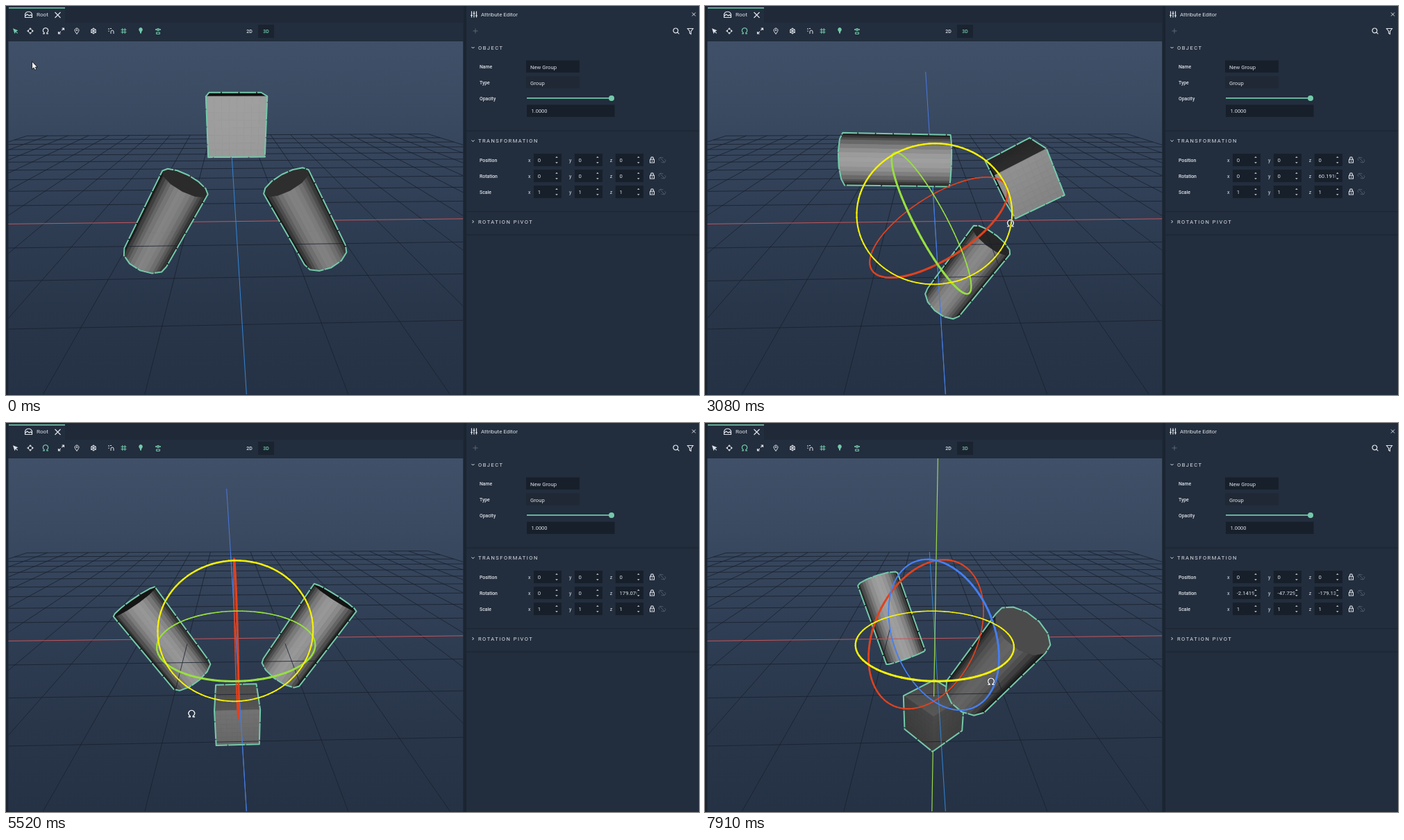
Write an HTML page with a canvas that moves like this. It is 998 px wide and 561 px high and loops after 8 s.

```html
<!DOCTYPE html>
<html lang="en">
<head>
<meta charset="utf-8">
<title>Group rotation</title>
<style>
html, body { margin: 0; width: 100%; height: 100%; overflow: hidden; background: #222d3d; }
canvas { display: block; width: 998px; height: 561px; }
</style>
</head>
<body>
<canvas id="stage" width="998" height="561"></canvas>
<script>
const ctx = document.getElementById('stage').getContext('2d');
const { sin, cos, PI, hypot, max, min, floor } = Math;
const RAD = PI / 180, LOOP = 8000;
const MINT = '#74c9aa', WHITE = '#dfe4ea', DIM = '#4d5a6b';

// ---------- timing ----------
// Bursts of evenly spaced picture updates: [start, end, steps]
const BURSTS = [[120, 550, 4], [940, 1910, 8], [2040, 3080, 9], [3230, 4190, 8],
  [4310, 4970, 6], [5520, 6480, 7], [6620, 7130, 5], [7280, 7550, 3], [7670, 7910, 3]];

function snap(t) {
  let at = 0;
  for (const [a, b, n] of BURSTS) {
    if (t < a) break;
    const step = (b - a) / (n - 1);
    at = min(b, a + floor((t - a) / step + 1e-6) * step);
  }
  return at;
}

const mix = (a, b, k) => a + (b - a) * k;

function track(keys, t) {
  if (t <= keys[0][0]) return keys[0][1];
  for (let i = 1; i < keys.length; i++) {
    const [t0, v0] = keys[i - 1], [t1, v1] = keys[i];
    if (t <= t1) return mix(v0, v1, (t - t0) / (t1 - t0));
  }
  return keys[keys.length - 1][1];
}

// The solids run slightly ahead of the rings and the number fields
const LEAD = 18;
const SPIN = [[1780, 0], [1910, 1.2508], [2300, 17], [3080, 60.191], [4310, 141.62],
  [4970, 177.6], [5520, 179.07], [5680, 180.87]];
const TURN = [[6600, 0], [7130, 16.298], [7910, 47.729]];
const PITCH = [[6600, 0], [6760, 0.95], [7130, 1.3896], [7910, 2.1419]];
const REACH = [[1910, 114], [3080, 109], [4310, 105], [5520, 126]];
const MOVE_X = [[0, 38], [550, 60], [940, 60], [1640, 388], [1780, 391]];
const MOVE_Y = [[0, 81], [550, 34], [940, 34], [1640, 210], [1780, 213]];
const LEAVE_X = [[5680, 266], [6400, 273], [6620, 275], [7130, 319], [7910, 412]];
const LEAVE_Y = [[5680, 418], [6400, 366], [6620, 366], [7130, 372], [7910, 373]];

function pointer(t, spin) {
  if (t < 1800) return [track(MOVE_X, t), track(MOVE_Y, t)];
  if (t > 5680) return [track(LEAVE_X, t), track(LEAVE_Y, t)];
  const a = (spin + 31.3) * RAD, r = track(REACH, t);
  return [CX + r * sin(a), CY - r * cos(a)];
}

// ---------- camera ----------
const CX = 331, CY = 310.6, F = 452, D = 6.64, R = 1.635;
const TS = sin(25.6 * RAD), TC = cos(25.6 * RAD), YS = sin(0.0266), YC = cos(0.0266);
const EYE = [-D * TC * YS, D * TS, D * TC * YC];

function project([x, y, z]) {
  const a = x * YC + z * YS, b = z * YC - x * YS, d = D - y * TS - b * TC;
  return [CX + F * a / d, CY - F * (y * TC - b * TS) / d, d];
}

const lerp3 = (a, b, k) => a.map((v, i) => mix(v, b[i], k));

function line3(a, b, color, width = 1) {
  const near = 0.3, da = project(a)[2], db = project(b)[2];
  if (da < near && db < near) return;
  if (da < near) a = lerp3(a, b, (near - da) / (db - da));
  if (db < near) b = lerp3(a, b, (near - project(a)[2]) / (db - project(a)[2]));
  const p = project(a), q = project(b);
  ctx.strokeStyle = color;
  ctx.lineWidth = width;
  ctx.beginPath();
  ctx.moveTo(p[0], p[1]);
  ctx.lineTo(q[0], q[1]);
  ctx.stroke();
}

// clockwise about z
const roll = ([x, y, z], a) => [x * cos(a) + y * sin(a), y * cos(a) - x * sin(a), z];
const swing = ([x, y, z], a) => [x * cos(a) + z * sin(a), y, z * cos(a) - x * sin(a)];

function poseAt(t) {
  const spin = track(SPIN, t) * RAD, turn = track(TURN, t) * RAD;
  return p => roll(swing(p, turn), spin);
}

// ---------- models ----------
function makeCube() {
  const faces = [], n = 8;
  for (let axis = 0; axis < 3; axis++) for (const side of [-1, 1]) {
    const at = (u, v) => {
      const p = [];
      p[axis] = side / 2;
      p[(axis + 1) % 3] = u / n - 0.5;
      p[(axis + 2) % 3] = v / n - 0.5;
      p[1] += 2;
      return p;
    };
    const normal = [0, 0, 0];
    normal[axis] = side;
    for (let u = 0; u < n; u++) for (let v = 0; v < n; v++)
      faces.push({ pts: [at(u, v), at(u + 1, v), at(u + 1, v + 1), at(u, v + 1)], normal, flat: normal });
  }
  return { faces, center: [0, 2, 0] };
}

function makeCylinder(x, tilt) {
  const n = 12, strips = 3, faces = [], center = [x, 0, 0];
  const place = p => { const q = roll(p, tilt); return [q[0] + x, q[1], q[2]]; };
  const rim = (i, h) => [0.5 * cos(i * 2 * PI / n), h, 0.5 * sin(i * 2 * PI / n)];
  const dir = i => roll([cos(i * 2 * PI / n), 0, sin(i * 2 * PI / n)], tilt);
  for (let i = 0; i < n; i++) for (let j = 0; j < strips; j++) {
    const at = (k, h) => place(lerp3(rim(i, h), rim(i + 1, h), k / strips));
    faces.push({
      pts: [at(j, -1), at(j + 1, -1), at(j + 1, 1), at(j, 1)],
      normal: dir(i + (j + 0.5) / strips), flat: dir(i + 0.5)
    });
  }
  for (const h of [-1, 1]) {
    const normal = roll([0, h, 0], tilt);
    faces.push({ pts: Array.from({ length: n }, (_, i) => place(rim(i, h))), normal, flat: normal });
  }
  return { faces, center };
}

const MODELS = [makeCube(), makeCylinder(-1.5, PI / 6), makeCylinder(1.5, -PI / 6)];

const dot = (a, b) => a[0] * b[0] + a[1] * b[1] + a[2] * b[2];

// Lit from the eye, so faces turned away are dropped
function shadeFaces(model, pose) {
  const out = [];
  for (const f of model.faces) {
    const pts = f.pts.map(pose);
    const mid = [0, 1, 2].map(i => pts.reduce((s, p) => s + p[i], 0) / pts.length);
    const ray = EYE.map((v, i) => v - mid[i]);
    if (dot(pose(f.flat), ray) <= 0) continue;
    const lit = max(0, dot(pose(f.normal), ray) / hypot(...ray));
    const g = Math.round(14 + 146 * lit ** 1.5);
    out.push({ pts, color: `rgb(${g},${g},${g})` });
  }
  return out;
}

function cutByGround(pts, side) {
  const out = [];
  pts.forEach((p, i) => {
    const q = pts[(i + 1) % pts.length];
    if (p[1] * side >= 0) out.push(p);
    if (p[1] * q[1] < 0) out.push(lerp3(p, q, p[1] / (p[1] - q[1])));
  });
  return out;
}

function paint(faces, side) {
  ctx.lineWidth = 0.7;
  for (const f of faces) {
    const pts = cutByGround(f.pts, side);
    if (pts.length < 3) continue;
    ctx.fillStyle = ctx.strokeStyle = f.color;
    ctx.beginPath();
    pts.map(project).forEach(p => ctx.lineTo(p[0], p[1]));
    ctx.closePath();
    ctx.fill();
    ctx.stroke();
  }
}

function hullPath(faces) {
  const pts = faces.flatMap(f => f.pts.map(project)).sort((a, b) => a[0] - b[0] || a[1] - b[1]);
  const half = list => {
    const h = [];
    for (const p of list) {
      while (h.length > 1) {
        const [a, b] = h.slice(-2);
        if ((b[0] - a[0]) * (p[1] - a[1]) - (b[1] - a[1]) * (p[0] - a[0]) > 0.01) break;
        h.pop();
      }
      h.push(p);
    }
    return h.slice(0, -1);
  };
  const path = new Path2D();
  [...half(pts), ...half(pts.reverse())].forEach(p => path.lineTo(p[0], p[1]));
  path.closePath();
  return path;
}

function outline(hulls) {
  hulls.forEach((hull, i) => {
    ctx.save();
    for (const nearer of hulls.slice(i + 1)) {
      const hole = new Path2D();
      hole.rect(0, 0, 998, 561);
      hole.addPath(nearer);
      ctx.clip(hole, 'evenodd');
    }
    ctx.strokeStyle = MINT;
    ctx.lineWidth = 2;
    ctx.lineJoin = 'round';
    ctx.setLineDash([24, 1.5]);
    ctx.stroke(hull);
    ctx.restore();
  });
}

function ring(axis, color, pose) {
  const n = 96;
  const at = i => {
    const a = i * 2 * PI / n, p = [0, 0, 0];
    p[(axis + 1) % 3] = R * cos(a);
    p[(axis + 2) % 3] = R * sin(a);
    return pose(p);
  };
  ctx.lineCap = 'round';
  for (let i = 0; i < n; i++) {
    const a = at(i);
    line3(a, at(i + 1), color, 2.1 * (D / project(a)[2]) ** 1.5);
  }
  ctx.lineCap = 'butt';
}

function grid(guide) {
  const dark = 'rgba(24,32,46,.8)';
  for (let i = -10; i <= 10; i++) if (i) {
    line3([i, 0, -10], [i, 0, 10], dark);
    line3([-10, 0, i], [10, 0, i], dark);
  }
  line3([-10, 0, 0], [10, 0, 0], '#c4555a');
  line3([0, 0, -10], [0, 0, 10], '#3485d4');
  if (guide) line3([0, 0, -2000], [0, 0, 10], '#4a78e0');
}

function viewport(t) {
  ctx.save();
  ctx.beginPath();
  ctx.rect(3.5, 51, 655, 509);
  ctx.clip();
  const sky = ctx.createLinearGradient(0, 51, 0, 560);
  [[0, '#405068'], [0.2, '#3a4a61'], [0.48, '#2f3e54'], [0.75, '#29364a'], [1, '#253245']]
    .forEach(s => sky.addColorStop(...s));
  ctx.fillStyle = sky;
  ctx.fillRect(3, 51, 656, 510);

  const pose = poseAt(t + LEAD), gizmo = poseAt(t);
  const items = MODELS.map(m => ({ faces: shadeFaces(m, pose), depth: project(pose(m.center))[2] }))
    .sort((a, b) => b.depth - a.depth);
  const guideZ = t >= 1760 && t < 5800, guideY = t >= 6600;
  const stem = (a, b) => guideY && line3(gizmo([0, a, 0]), gizmo([0, b, 0]), '#9bd84c', 1.2);

  stem(1.5, 40);
  items.forEach(o => paint(o.faces, -1));
  grid(guideZ);
  items.forEach(o => paint(o.faces, 1));
  stem(1.5, -40);
  outline(items.map(o => hullPath(o.faces)));

  if (t >= 940) {
    const hot = t >= 6300 ? 1 : t >= 1600 && t < 5900 ? 2 : -1;
    ['#df421f', '#97e03f', '#447ff5'].forEach((c, axis) => axis !== hot && ring(axis, c, gizmo));
    if (hot >= 0) ring(hot, '#f6f205', gizmo);
  }
  ctx.restore();
}

// ---------- interface ----------
function box(x, y, w, h, color) {
  ctx.fillStyle = color;
  ctx.fillRect(x, y, w, h);
}

function text(s, x, y, size, color = WHITE, { gap = 0, weight = 400, align = 'left' } = {}) {
  ctx.font = `${weight} ${size}px Roboto, sans-serif`;
  ctx.letterSpacing = gap + 'px';
  ctx.textAlign = align;
  ctx.textBaseline = 'alphabetic';
  ctx.fillStyle = color;
  ctx.fillText(s, x, y + size * 0.355);
}

function icon(x, y, d, color = WHITE, fill = false, width = 1) {
  ctx.save();
  ctx.translate(x, y);
  const p = new Path2D(d);
  ctx.lineWidth = width;
  ctx.strokeStyle = ctx.fillStyle = color;
  if (fill) ctx.fill(p); else ctx.stroke(p);
  ctx.restore();
}

const OMEGA = 'M-4 3.8H-1.8V2.6A3.7 3.7 0 1 1 1.8 2.6V3.8H4';
const BIG_OMEGA = 'M-4.8 4.4H-2V3.4A4.4 4.4 0 1 1 2 3.4V4.4H4.8';
const ARROW = 'M0 0V9.2L2.2 7.2L3.8 10.8L5.2 10.2L3.6 6.7H6.4Z';
const OPEN = 'M-2-1L0 1L2-1', SHUT = 'M-1-2L1 0L-1 2';

function toolbar(rotating) {
  box(4, 2, 81, 1.6, MINT);
  icon(32.5, 12, 'M-5 4.5V0A5.2 5.2 0 0 1 5 0V4.5ZM-5 2.5L-2 0L1 2L3 .8L5 2.5', WHITE, false, 1.2);
  text('Root', 44, 12.5, 8.1);
  icon(74.5, 13, 'M-4-4L4 4M4-4L-4 4', WHITE, false, 1.2);

  icon(10, 32.3, 'M0 0L2.5 8L4 5L6.2 7.4L7 6.6L4.8 4.2L7.5 3Z', rotating ? WHITE : MINT, true);
  icon(35, 36, 'M-1.5-2.5L0-4.4L1.5-2.5ZM-1.5 2.5L0 4.4L1.5 2.5ZM-2.5-1.5L-4.4 0L-2.5 1.5ZM2.5-1.5L4.4 0L2.5 1.5Z');
  icon(57, 36, OMEGA, rotating ? MINT : WHITE, false, 1.2);
  icon(79.5, 36, 'M1-4H4V-1M4-4L.8-.8M-1 4H-4V1M-4 4L-.8 .8', WHITE, false, 1.2);
  icon(102, 36, 'M0 4.5L-2.6 .5A3 3 0 1 1 2.6 .5ZM-.6-1.2A.7 .7 0 1 0 .6-1.2A.7 .7 0 1 0-.6-1.2');
  icon(126, 36, 'M0-4.5V4.5M-4 2.5L0 0L4 2.5M-3.2-2L0-3.6L3.2-2V2L0 3.6L-3.2 2ZM-3.2-2L0 0L3.2-2');
  icon(151, 36, 'M-3-4V-2M-3-.5V1M-1-3.5H1M0 4V1A2 2 0 0 1 4 1V4');
  icon(169.5, 36, 'M-1.7-4V4M1.7-4V4M-4-1.7H4M-4 1.7H4', MINT);
  icon(194, 35, 'M-1 2.5L-2.4 .4A2.8 2.8 0 1 1 2.4 .4L1 2.5V4.5H-1Z', MINT, true);
  icon(219, 36, 'M-4-2Q0-5 4-2Q0 1 -4-2M-1-2A1 1 0 1 0 1-2A1 1 0 1 0-1-2M-2.5 2H2.5V4.4H-2.5Z', MINT);
  text('2D', 350.5, 36.3, 7, WHITE, { weight: 500, align: 'center' });
  box(363, 27, 23, 19, '#1a2330');
  text('3D', 374.5, 36.3, 7, MINT, { weight: 500, align: 'center' });
}

function section(name, y, open) {
  icon(672.5, y, open ? OPEN : SHUT);
  text(name, 680, y + 0.3, 7.5, WHITE, { gap: 1.5 });
}

function field(name, value, x, y) {
  text(name, x - 8, y + 0.2, 7);
  box(x, y - 9, 40, 18, '#171f2b');
  ctx.save();
  ctx.beginPath();
  ctx.rect(x, y - 9, 30.5, 18);
  ctx.clip();
  text(value, x + 5.7, y + 0.3, 7.7);
  ctx.restore();
  icon(x + 33, y, 'M-1.8-3.2L0-5L1.8-3.2ZM-1.8 3.2L0 5L1.8 3.2Z', WHITE, true);
}

function panel(rotation) {
  box(658.5, 0, 4.5, 561, '#1b2532');
  icon(674, 12, 'M-3.5-4.5V4.5M0-4.5V4.5M3.5-4.5V4.5M-5 1.5H-2M-1.5-1.5H1.5M2 2H5', WHITE, false, 1.2);
  text('Attribute Editor', 684, 12.5, 7.9);
  icon(990.5, 12, 'M-2.5-2.5L2.5 2.5M2.5-2.5L-2.5 2.5');
  icon(676, 36, 'M-3.5 0H3.5M0-3.5V3.5', '#596677');
  icon(965, 36, 'M-4-.6A3.4 3.4 0 1 0 2.8-.6A3.4 3.4 0 1 0-4-.6M1.9 1.9L4.4 4.4', WHITE, false, 1.2);
  icon(985.5, 36.5, 'M-4-4H4L1 0V4L-1 2.8V0Z', WHITE, false, 1.1);

  section('OBJECT', 60, true);
  const label = (s, y) => text(s, 682, y + 0.3, 6.85, WHITE, { weight: 500 });
  label('Name', 87.5);
  box(749, 78.5, 77, 17.5, '#171f2b');
  text('New Group', 755, 87.8, 7.7);
  label('Type', 110.5);
  box(749, 101.5, 77, 17, '#1f2834');
  text('Group', 755, 110.8, 7.7);
  label('Opacity', 133);
  box(750, 132, 122, 1.7, MINT);
  ctx.fillStyle = MINT;
  ctx.beginPath();
  ctx.arc(872, 133, 4, 0, 2 * PI);
  ctx.fill();
  box(750, 142.5, 126.5, 17.5, '#171f2b');
  text('1.0000', 756.5, 151.5, 7.5);

  const rule = y => box(663, y, 335, 1, '#1a2431');
  rule(179.5);
  section('TRANSFORMATION', 194.5, true);
  const rows = [['Position', ['0', '0', '0']], ['Rotation', rotation], ['Scale', ['1', '1', '1']]];
  rows.forEach(([name, values], i) => {
    const y = 222 + i * 23;
    label(name, y);
    values.forEach((v, k) => field('xyz'[k], v, 760 + k * 58.9, y));
    icon(930.5, y, 'M-3-.8H3V4H-3ZM-1.9-.8V-2.2A1.9 1.9 0 0 1 1.9-2.2V-.8M0 .8V2.4', WHITE, false, 1.1);
    icon(945, y, 'M-1-3.5A2.5 2.5 0 0 0-3.5 1M1 3.5A2.5 2.5 0 0 0 3.5-1M-4-4L4 4M-1-3.5L1.5-3M1 3.5L-1.5 3', DIM);
  });
  rule(296);
  section('ROTATION PIVOT', 311, false);
  rule(329.5);
}

function drawPointer(t, spin) {
  const [x, y] = pointer(t, spin);
  if (t >= 940 && y > 51) {
    icon(x, y, BIG_OMEGA, 'rgba(28,37,51,.6)', false, 2.4);
    icon(x, y, BIG_OMEGA, '#f2f4f7', false, 1.4);
  } else {
    icon(x, y, ARROW, '#10151d', false, 1.4);
    icon(x, y, ARROW, '#ffffff', true);
  }
}

const show = v => v ? v.toFixed(4) : '0';

function frame(now) {
  const t = snap(now % LOOP);
  const spin = track(SPIN, t);
  box(0, 0, 998, 561, '#222d3d');
  box(0, 0, 3.5, 561, '#1b2532');
  box(85, 0, 573, 24, '#1f2938');
  viewport(t);
  toolbar(t >= 940);
  panel([show(-track(PITCH, t)), show(-track(TURN, t)), show(spin > 180 ? spin - 360 : spin)]);
  drawPointer(t, spin);
}

const begin = performance.now();
function tick() {
  frame(performance.now() - begin);
  requestAnimationFrame(tick);
}
tick();
</script>
</body>
</html>
```
